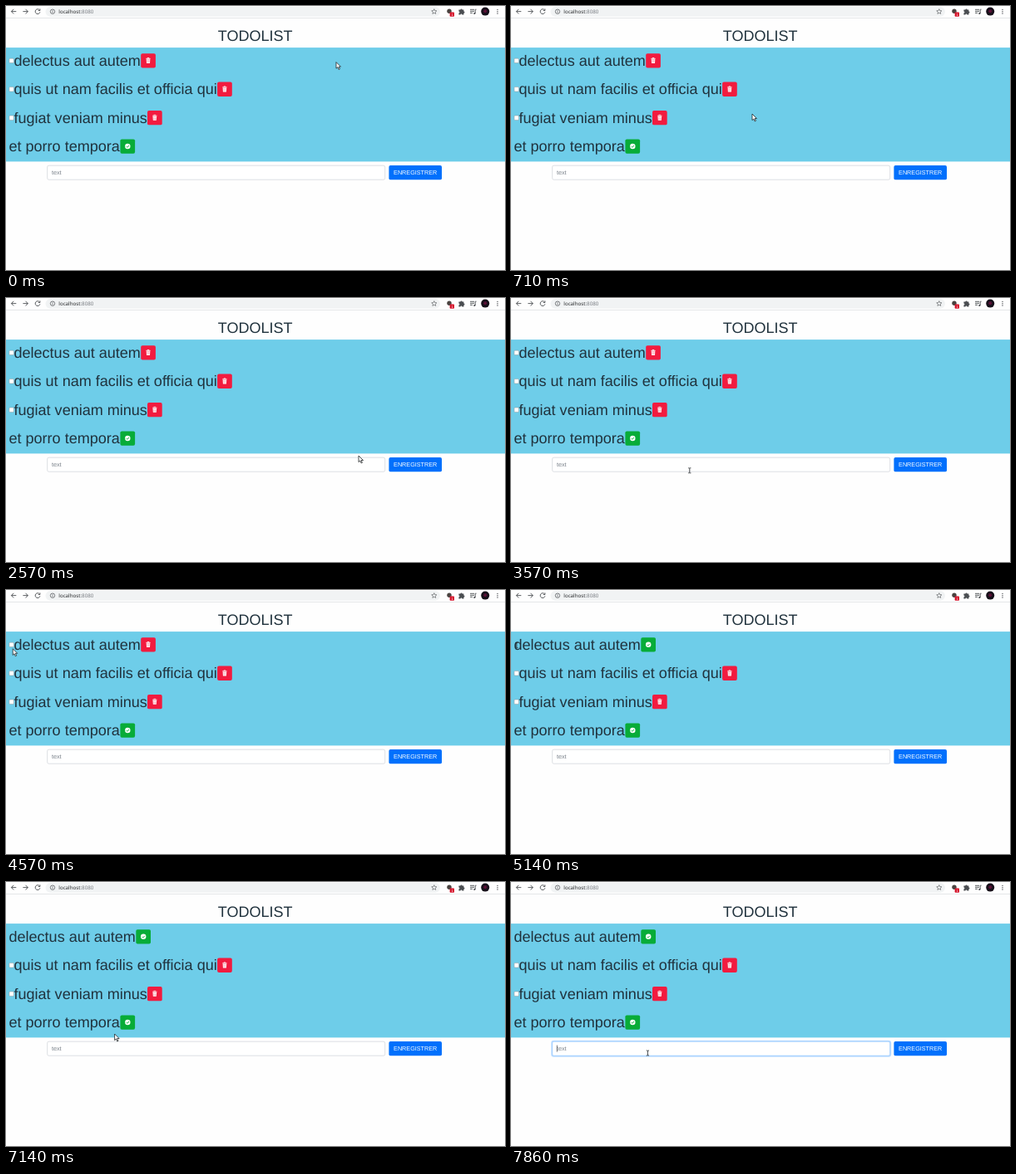
These frames come from a looping animation (600 by 318 pixels, 8000 ms). An HTML page:

```html
<!DOCTYPE html>
<html lang="fr">
<head>
<meta charset="utf-8">
<title>Todolist</title>
<style>
  html, body { margin: 0; width: 100%; height: 100%; overflow: hidden; background: #fefefe; }
  svg { display: block; }
  text { font-family: "Liberation Sans", Arial, sans-serif; text-rendering: geometricPrecision; white-space: pre; }
  .big { font-size: 18.05px; fill: #20323d; }
  .small { font-size: 7.24px; }
  .url { font: 6.2px "Noto Sans", "Open Sans", sans-serif; }
  .line { fill: none; stroke: #4a4d51; stroke-width: .9; }
</style>
</head>
<body>
<svg width="600" height="318" viewBox="0 0 600 318">
  <defs>
    <g id="box">
      <rect x="3.9" y="-8.8" width="5.4" height="5.4" rx=".9" fill="#fff" stroke="#8a9296" stroke-width=".5"/>
    </g>
    <g id="trash">
      <rect width="17.7" height="17.3" rx="1.9" fill="#f21b3f"/>
      <path d="M6.1 6.2h5.4M7.8 6V5.3h2V6" fill="none" stroke="#fff" stroke-width=".8"/>
      <path d="M6.5 7h4.6l-.3 4.8h-4z" fill="#fff"/>
      <path d="M7.9 7.8v3.2M9.7 7.8v3.2" stroke="#f21b3f" stroke-width=".4"/>
    </g>
    <g id="check">
      <rect width="17.7" height="17.3" rx="1.9" fill="#08ac38"/>
      <circle cx="8.9" cy="8.6" r="3.2" fill="#fff"/>
      <path d="M7.2 8.7l1.2 1.2 2.2-2.3" fill="none" stroke="#08ac38" stroke-width=".9"/>
    </g>
  </defs>

  <rect width="600" height="318" fill="#fefefe"/>

  <!-- browser bar -->
  <rect y="14" width="600" height=".7" fill="#dcdee1"/>
  <rect x="47.5" y=".9" width="474.5" height="11.8" rx="5.9" fill="#f1f3f4"/>
  <path class="line" d="M12.3 6.6H6.5M9.2 3.8L6.4 6.6l2.8 2.8"/>
  <path class="line" d="M20.4 6.6h5.8M23.5 3.8l2.8 2.8-2.8 2.8"/>
  <path class="line" d="M40.4 4.9a2.9 2.9 0 1 0 .5 2.4M40.9 3.4v2.1h-2.1"/>
  <circle class="line" cx="56" cy="6.7" r="2.7" style="stroke-width:.7"/>
  <path class="line" d="M56 6.3v1.9M56 5v.7" style="stroke-width:.7"/>
  <text class="url" x="63.3" y="8.9" fill="#27292c">localhost<tspan fill="#777b80">:8080</tspan></text>
  <path class="line" style="stroke-width:.6" d="M514.8 3.6l.9 2 2.2.2-1.7 1.5.5 2.1-1.9-1.1-1.9 1.1.5-2.1-1.7-1.5 2.2-.2z"/>
  <circle cx="533" cy="6.3" r="2.7" fill="#4a4340"/>
  <rect x="533.6" y="7.6" width="5.4" height="5.2" rx=".8" fill="#d5142c"/>
  <text x="535.6" y="11.8" font-size="4" fill="#fff">1</text>
  <path fill="#4a4d51" d="M544.4 4.6h2a1.1 1.1 0 0 1 2.2 0h1.8v1.9a1.1 1.1 0 0 1 0 2.2v1.8h-2a1 1 0 0 0-2 0h-2v-2a1 1 0 0 0 0-2z"/>
  <path class="line" d="M558 4.3h5M558 6.3h5M558 8.3h3M564.2 9V4.2h1.4"/>
  <circle cx="563.3" cy="9" r="1.1" fill="#4a4d51"/>
  <circle cx="576.2" cy="6.6" r="5" fill="#17101a"/>
  <circle cx="576.2" cy="6.3" r="2" fill="#5a1237"/>
  <g fill="#4a4d51"><circle cx="591" cy="4.4" r=".7"/><circle cx="591" cy="6.7" r=".7"/><circle cx="591" cy="9" r=".7"/></g>

  <text class="big" x="299.7" y="41.9" text-anchor="middle">TODOLIST</text>
  <rect y="50.1" width="600" height="137.3" fill="#6ecde9"/>
  <g id="list"></g>

  <!-- form -->
  <rect id="glow" x="48.2" y="190.7" width="409" height="20" rx="3" fill="#bfdeff"/>
  <rect id="field" x="49.7" y="192.2" width="406" height="17" rx="1.8" fill="#fff" stroke-width=".6"/>
  <text class="small" x="54.9" y="203" fill="#7a828a">text</text>
  <rect id="caret" x="54.9" y="196.6" width=".7" height="8" fill="#3c4248"/>
  <rect x="460.4" y="192" width="63.6" height="17.3" rx="1.9" fill="#0070fc"/>
  <text class="small" x="492.2" y="203.1" fill="#fff" text-anchor="middle">ENREGISTRER</text>

  <g id="cursor">
    <path id="arrow" d="M0 0v7.6l1.8-1.6 1.3 2.9 1.3-.6-1.3-2.8h2.4z" fill="#fff" stroke="#15181a" stroke-width=".75"/>
    <path id="beam" d="M-1.6-3h1.1l.5.4.5-.4h1.1M-1.6 3h1.1l.5-.4.5.4h1.1M0-2.6v5.2" fill="none" stroke="#24292c" stroke-width=".85"/>
    <path id="hand" d="M-.7-.3q.7-.7 1.4 0v2.5l3 .6q.8.2.7 1L4 6.6H-.2L-2.4 3.8q.2-.9 1.7.2z" fill="#fff" stroke="#15181a" stroke-width=".7"/>
  </g>
</svg>
<script>
const LOOP = 8000, STEP = 1000 / 7;
const DONE_AT = 35, FOCUS_AT = 54;
const TOP = 57.2, PITCH = 34.4;

// label, right edge while open, right edge when done
const items = [
  { label: "delectus aut autem", open: 162.2, done: 156.3 },
  { label: "quis ut nam facilis et officia qui", open: 254.1 },
  { label: "fugiat veniam minus", open: 170 },
  { label: "et porro tempora", done: 137.4 }
];

// step, x, y of the pointer
const path = [
  [0, 397, 67.6], [2, 370, 84], [5, 290, 130], [8, 215, 148], [10, 180, 134], [11, 177, 133],
  [12, 120, 150], [13, 40, 172], [14, 120, 240], [15, 240, 264], [16, 350, 222],
  [18, 424, 190], [20, 350, 102], [22, 230, 140], [24, 212, 200], [25, 214.8, 207.8],
  [26, 238, 200], [28, 150, 150], [30, 50, 98], [32, 8.2, 70.8], [34, 6.5, 66.5], [37, 7, 66.5],
  [39, 95, 66], [41, 216, 67], [42, 145.3, 64.2], [45, 75, 65],
  [47, 110, 104], [50, 130.6, 183], [52, 164.4, 206], [56, 164.4, 206]
];

const $ = id => document.getElementById(id);
const show = (id, on) => $(id).setAttribute("visibility", on ? "visible" : "hidden");

function row(item, i, done) {
  const y = TOP + i * PITCH;
  const edge = done ? item.done : item.open;
  return `<g transform="translate(0 ${y + 14.8})">${done ? "" : '<use href="#box"/>'}
    <text class="big" x="${done ? 3.5 : 9.5}">${item.label}</text></g>
    <use href="#${done ? "check" : "trash"}" x="${edge}" y="${y}"/>`;
}

function isDone(i, step) {
  return i === 3 || (i === 0 && step >= DONE_AT);
}

function pointerAt(step) {
  const n = path.findIndex(p => p[0] > step);
  const [s0, x0, y0] = path[n - 1], [s1, x1, y1] = path[n];
  const k = (step - s0) / (s1 - s0);
  return [x0 + (x1 - x0) * k, y0 + (y1 - y0) * k];
}

// the pointer's shape follows what lies under it
function shapeAt(x, y, step) {
  if (y > 192 && y < 209.4 && x > 49 && x < 456) return "beam";
  const i = Math.floor((y - TOP) / PITCH);
  if (!items[i] || y - TOP - i * PITCH > 17.3) return "arrow";
  const done = isDone(i, step);
  const edge = done ? items[i].done : items[i].open;
  if (x >= edge && x <= edge + 17.7) return "hand";
  return x > (done ? 3.5 : 9.5) && x < edge ? "beam" : "arrow";
}

let last = -1;
function draw(step) {
  $("list").innerHTML = items.map((it, i) => row(it, i, isDone(i, step))).join("");

  const focus = Math.max(0, Math.min(1, (step - FOCUS_AT + 1) / 2));
  $("glow").setAttribute("opacity", focus);
  $("field").setAttribute("stroke", ["#c6ccd2", "#a7c5e9", "#80bdff"][focus * 2]);
  show("caret", focus > 0);

  const [x, y] = pointerAt(step);
  const shape = shapeAt(x, y, step);
  $("cursor").setAttribute("transform", `translate(${x} ${y})`);
  for (const id of ["arrow", "beam", "hand"]) show(id, id === shape);
}

const start = performance.now();
function tick() {
  const t = (performance.now() - start) % LOOP;
  const step = Math.min(55, Math.floor((t + 5) / STEP));
  if (step !== last) draw(last = step);
  requestAnimationFrame(tick);
}
tick();
</script>
</body>
</html>
```
